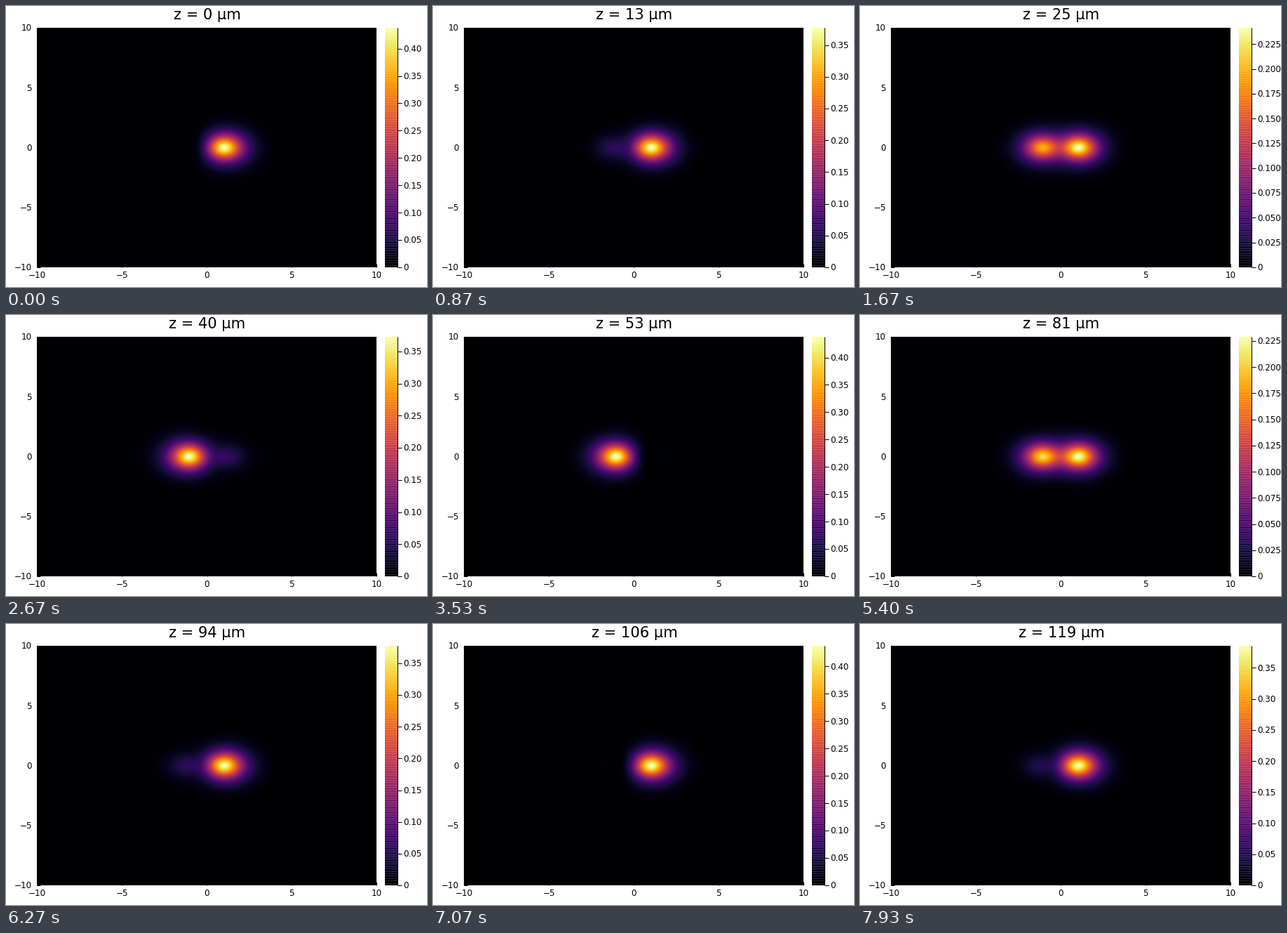
A matplotlib script that plays this animation: 600 by 400 pixels, repeating every 8 s.

```python
import numpy as np
import matplotlib.pyplot as plt
from matplotlib.animation import FuncAnimation

W, H, DPI = 600, 400, 100
FRAMES, INTERVAL = 200, 40        # 120 steps of z spread over 200 ticks
LEFT, RIGHT, TOP, BOTTOM = 44, 528, 31, 372
BAR_L, BAR_R = 540, 558
LEVELS = 100
PHASE_STEP = np.radians(3.3655)   # beat phase per micrometre
PEAK = 0.438                      # intensity maximum at z = 0


def px(size):
    return size * 72 / DPI


plt.rcParams["font.family"] = "DejaVu Sans"
fig = plt.figure(figsize=(W / DPI, H / DPI), dpi=DPI, facecolor="white")
ax = fig.add_axes([0, 0, 1, 1])
ax.axis("off")


def label(x, y, s, size=12, ha="center"):
    return ax.text(x, y, s, fontsize=px(size), ha=ha, va="baseline", color="black")


def line(xs, ys):
    return ax.plot(xs, ys, color="black", lw=px(1), solid_capstyle="butt")[0]


# Even and odd modes of two coupled cores, equal in strength at x = 1
def lobe(x, y, centre):
    return np.exp(1 - np.sqrt((x - centre) ** 2 + y**2 + 1))


def even(x, y):
    return lobe(x, y, 0.85) + lobe(x, y, -0.85)


def odd(x, y):
    return lobe(x, y, 1.05) - lobe(x, y, -1.05)


gx, gy = np.meshgrid(np.linspace(-10, 10, RIGHT - LEFT),
                     np.linspace(-10, 10, BOTTOM - TOP))
e = even(gx, gy) / even(1, 0)
o = odd(gx, gy) / odd(1, 0)
mean, beat = (e**2 + o**2) / 2, e * o
scale = PEAK / (mean + beat).max()


def intensity(z):
    return scale * (mean + beat * np.cos(PHASE_STEP * z))


field = ax.imshow(intensity(0), cmap="inferno", vmin=0, vmax=PEAK, aspect="auto",
                  extent=(LEFT, RIGHT, BOTTOM, TOP), interpolation="nearest")

# Colour bar with its fine seams
ax.imshow(np.linspace(1, 0, LEVELS)[:, None], cmap="inferno", aspect="auto",
          extent=(BAR_L, BAR_R, BOTTOM, TOP), interpolation="nearest")
ax.hlines(np.linspace(TOP, BOTTOM, LEVELS + 1)[1:-1], BAR_L, BAR_R,
          colors="white", lw=px(0.6), alpha=0.25)
line([BAR_R, BAR_R], [TOP, BOTTOM])

for v in (-10, -5, 0, 5, 10):
    name = str(v).replace("-", "\u2212")
    tx = LEFT + (v + 10) / 20 * (RIGHT - LEFT)
    ty = BOTTOM - (v + 10) / 20 * (BOTTOM - TOP)
    line([tx, tx], [BOTTOM - 5, BOTTOM])
    line([LEFT, LEFT + 5], [ty, ty])
    label(tx, 387, name)
    label(37, ty + 4.4, name, ha="right")

title = label(287, 19, "", 21)
ticks = [(line([], []), label(566, 0, "", ha="left")) for _ in range(11)]

ax.set_xlim(0, W)
ax.set_ylim(H, 0)


def draw(i):
    z = (3 * i + 2) // 5
    data = intensity(z)
    top = data.max()
    field.set_data(data)
    field.set_clim(0, top)
    title.set_text(f"z = {z} \u03bcm")
    step, digits = (0.05, 2) if top > 0.25 else (0.025, 3)
    for k, (mark, text) in enumerate(ticks):
        v = k * step
        mark.set_visible(v <= top)
        text.set_visible(v <= top)
        ty = BOTTOM - v / top * (BOTTOM - TOP)
        mark.set_data([BAR_R, BAR_R + 6], [ty, ty])
        text.set_y(ty + 4.4)
        text.set_text(f"{v:.{digits}f}" if k else "0")
    return [field, title]


anim = FuncAnimation(fig, draw, frames=FRAMES, interval=INTERVAL,
                     init_func=lambda: draw(0), repeat=True, repeat_delay=0, blit=False)
plt.show()
```
